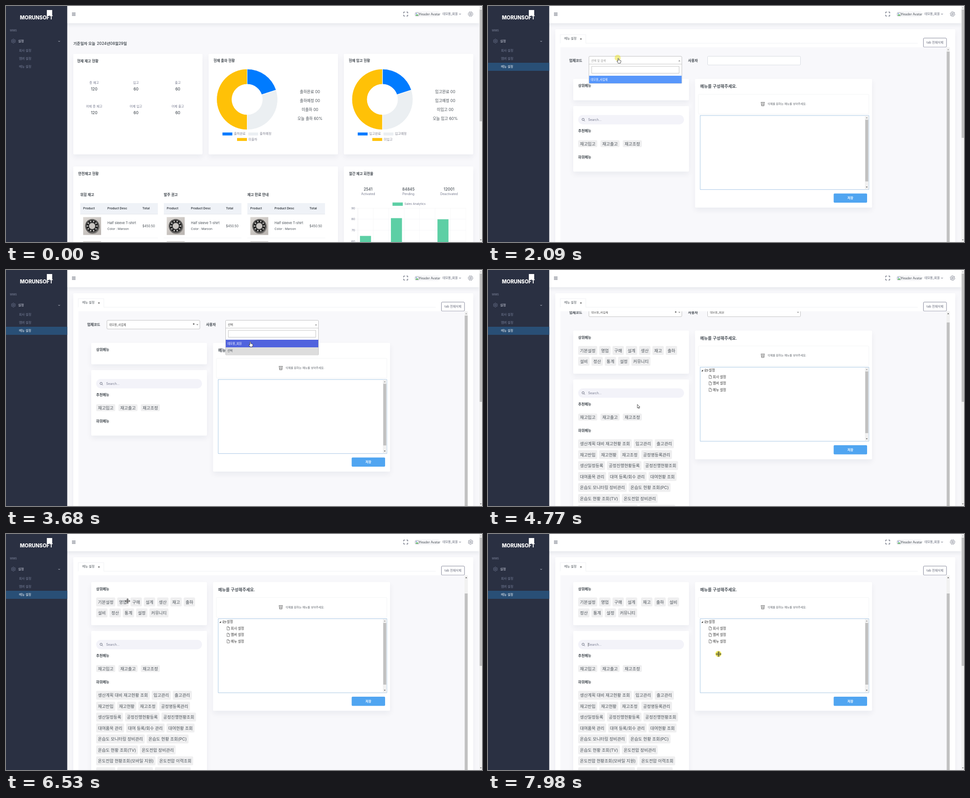
An HTML page with a canvas for the animation above (8 s loop, 1061 by 528 pixels).

```html
<!DOCTYPE html>
<html lang="ko">
<head>
<meta charset="utf-8">
<title>WMS</title>
<style>
html, body { margin: 0; width: 100%; height: 100%; overflow: hidden; background: #f8f8fb; }
canvas { display: block; width: 1061px; height: 528px; }
</style>
</head>
<body>
<canvas id="stage"></canvas>
<script>
const W = 1061, H = 528, LOOP = 8000;
const canvas = document.getElementById('stage');
const ctx = canvas.getContext('2d');
const dpr = window.devicePixelRatio || 1;
canvas.width = W * dpr;
canvas.height = H * dpr;

const FONT = 'Inter, "Noto Sans CJK KR", "Noto Sans CJK", sans-serif';
const INK = '#495057', DARK = '#3d444b', MUTED = '#74788d', NAV = '#79829c';
const BRAND = 'MORUNSOFT', USER = '데모용_회원', COMPANY = '데모용_사업체';

// ---------- helpers ----------
function text(s, x, y, size, color = INK, weight = 400, align = 'left', font = FONT) {
  ctx.font = `${weight} ${size}px ${font}`;
  ctx.fillStyle = color;
  ctx.textAlign = align;
  ctx.fillText(s, x, y + size * 0.36);
}

function rect(x1, y1, x2, y2, color) {
  ctx.fillStyle = color;
  ctx.fillRect(x1, y1, x2 - x1, y2 - y1);
}

function box(x1, y1, x2, y2, r, fill, stroke, lw = 0.7) {
  ctx.beginPath();
  ctx.roundRect(x1, y1, x2 - x1, y2 - y1, r);
  if (fill) { ctx.fillStyle = fill; ctx.fill(); }
  if (stroke) { ctx.strokeStyle = stroke; ctx.lineWidth = lw; ctx.stroke(); }
}

function card(x1, y1, x2, y2) {
  ctx.save();
  ctx.shadowColor = 'rgba(18,38,63,0.06)';
  ctx.shadowBlur = 13 * dpr;
  ctx.shadowOffsetY = 6 * dpr;
  box(x1, y1, x2, y2, 2, '#fff');
  ctx.restore();
}

function line(pts, color, lw = 1) {
  ctx.beginPath();
  for (let i = 0; i < pts.length; i += 2) ctx.lineTo(pts[i], pts[i + 1]);
  ctx.strokeStyle = color;
  ctx.lineWidth = lw;
  ctx.stroke();
}

function poly(pts, fill) {
  ctx.beginPath();
  for (let i = 0; i < pts.length; i += 2) ctx.lineTo(pts[i], pts[i + 1]);
  ctx.closePath();
  ctx.fillStyle = fill;
  ctx.fill();
}

function disc(x, y, r, fill) {
  ctx.beginPath();
  ctx.arc(x, y, r, 0, Math.PI * 2);
  ctx.fillStyle = fill;
  ctx.fill();
}

function ring(x, y, r, color, lw) {
  ctx.beginPath();
  ctx.arc(x, y, r, 0, Math.PI * 2);
  ctx.strokeStyle = color;
  ctx.lineWidth = lw;
  ctx.stroke();
}

// dir 1 points down, -1 points up
const caret = (x, y, dir, color, r = 2.3) =>
  poly([x - r, y - dir * r / 2, x + r, y - dir * r / 2, x, y + dir * r / 2], color);
const chevron = (x, y, color) => line([x - 1.8, y - 1, x, y + 1, x + 1.8, y - 1], color, 0.9);

function gear(x, y, r, angle, color) {
  ctx.beginPath();
  for (let i = 0; i < 48; i++) {
    const a = i * Math.PI / 24, d = r * (0.89 + 0.11 * Math.cos(6 * a));
    ctx.lineTo(x + d * Math.cos(a + angle), y + d * Math.sin(a + angle));
  }
  ctx.closePath();
  ctx.strokeStyle = color;
  ctx.lineWidth = 0.9;
  ctx.stroke();
  ring(x, y, r * 0.36, color, 0.9);
}

// ---------- frame around the pages ----------
function sidebar(t, onMenu) {
  rect(0, 0, 136.5, H, '#2a3042');
  rect(91, 9, 103, 21, '#fff');
  text(BRAND, 31, 26, 11.2, '#fff', 800);
  text('WMS', 8.5, 54.5, 6.1, '#6a7187', 600);
  gear(16.5, 78.5, 4.7, Math.PI / 6, NAV);
  text('설정', 27, 78.5, 7.1, '#d3d7e4', 500);
  chevron(118.5, 79, '#d3d7e4');
  text('회사 설정', 29, 100, 6.9, NAV);
  text('멤버 설정', 29, 118, 6.9, NAV);
  if (onMenu) rect(0, 127, 136.5, 145, '#294f76');
  const lit = onMenu || t >= 880;
  text('메뉴 설정', 29, 135.5, 6.9, lit ? '#fff' : NAV, lit ? 500 : 400);
}

function header(t, thumbEnd) {
  ctx.save();
  ctx.shadowColor = 'rgba(18,38,63,0.07)';
  ctx.shadowBlur = 8 * dpr;
  ctx.shadowOffsetY = 4 * dpr;
  rect(130, 0, 1055, 38.5, '#fff');
  ctx.restore();
  for (const y of [15.6, 18.4, 21.2]) line([147, y, 155, y], '#444a5c', 1);
  for (const sx of [-1, 1]) for (const sy of [-1, 1]) {
    const x = 891 + sx * 4.5, y = 18 + sy * 4.5;
    line([x - sx * 3, y, x, y, x, y - sy * 3], '#555b6d', 1.1);
  }
  box(910, 12, 968, 24.5, 6, '#f6f6f8');
  box(912.5, 15, 920, 22, 1, '#fff', '#8a8f99', 0.8);
  poly([913, 21.5, 916, 18, 918, 20, 919.5, 21.5], '#4caf50');
  disc(915, 17, 1.1, '#5b8def');
  text('Header Avatar', 920.5, 18.5, 7, INK);
  text(USER, 973, 18, 6.7, '#555b6d');
  chevron(1012, 18, '#555b6d');
  gear(1035.5, 18, 5.3, t / 2000 * Math.PI * 2, '#555b6d');
  rect(1055, 0, W, H, '#f1f1f1');
  rect(1055.8, 8, W, thumbEnd, '#c1c1c1');
  caret(1058.3, 4, -1, '#a3a3a3', 1.8);
  caret(1058.3, 523.5, 1, '#505050', 1.8);
}

// ---------- dashboard ----------
function stat(label, value, x, y) {
  text(label, x, y, 7, MUTED, 400, 'center');
  text(value, x, y + 15, 8.6, INK, 500, 'center');
}

function doughnut(cx, word) {
  const cy = 209, parts = [[-0.5, -0.1, '#007bff'], [-0.1, 0.5, '#ebeff2'], [0.5, 1.5, '#ffc107']];
  for (const [a, b, color] of parts) {
    ctx.beginPath();
    ctx.arc(cx, cy, 68, a * Math.PI, b * Math.PI);
    ctx.arc(cx, cy, 34, b * Math.PI, a * Math.PI, true);
    ctx.closePath();
    ctx.fillStyle = color;
    ctx.fill();
    ctx.strokeStyle = '#fff';
    ctx.lineWidth = 1;
    ctx.stroke();
  }
  text(`현재 ${word} 현황`, cx - 75, 122.5, 7.9, DARK, 600);
  const keys = [[-55, 283, '#007bff', word + '완료'], [2.5, 283, '#ebeff2', word + '예정'], [-22.5, 295.3, '#ffc107', '미' + word]];
  for (const [dx, y, color, label] of keys) {
    rect(cx + dx, y, cx + dx + 22, y + 6.6, color);
    text(label, cx + dx + 25.5, y + 2.8, 7.1, '#808291');
  }
  [`${word}완료 00`, `${word}예정 00`, `미${word} 00`, `오늘 ${word} 60%`].forEach((s, i) =>
    text(s, cx + 140, 192.2 + 19.8 * i, 8.6, INK, 400, 'center'));
}

function bearing(x, y) {
  const g = ctx.createLinearGradient(x, y, x + 30, y + 40);
  g.addColorStop(0, '#dcd8d4');
  g.addColorStop(1, '#bcb7b3');
  ctx.fillStyle = g;
  ctx.fillRect(x, y, 40, 40);
  const cx = x + 20, cy = y + 20;
  disc(cx + 1, cy + 2, 15.8, '#8d8986');
  disc(cx, cy, 15.5, '#343434');
  ring(cx, cy, 14.3, '#85827f', 1);
  ring(cx, cy, 10.7, '#1c1c1c', 4.4);
  for (let i = 0; i < 10; i++) {
    const a = i * Math.PI / 5;
    disc(cx + 10.7 * Math.cos(a), cy + 10.7 * Math.sin(a), 1.7, '#c9c7c5');
  }
  disc(cx, cy, 7, '#cbc7c3');
  ring(cx, cy, 7.3, '#555', 1.2);
}

function stockTable(title, x) {
  text(title, x, 422.5, 7.9, DARK, 600);
  rect(x, 441, x + 173, 466, '#eff2f7');
  line([x, 465.7, x + 173, 465.7], '#dde1e7', 0.7);
  text('Product', x + 6.5, 453, 6.8, '#343a40', 600);
  text('Product Desc', x + 60.5, 453, 6.8, '#343a40', 600);
  text('Total', x + 138.5, 453, 6.8, '#343a40', 600);
  bearing(x + 6.5, 472.3);
  text('Half sleeve T-shirt', x + 60.5, 485, 7.4, INK);
  text('Color : Maroon', x + 60.5, 499, 6.8, INK);
  text('$450.50', x + 138.5, 492, 7, INK);
  line([x, 519, x + 173, 519], '#eceef2', 0.7);
  rect(x + 6.5, 526.3, x + 46.5, H, '#d5d2d0');
}

function salesChart() {
  text('월간 재고 회전율', 764.5, 375, 7.8, DARK, 600);
  [['2541', 'Activated', 807], ['84845', 'Pending', 897], ['12001', 'Deactivated', 987.5]].forEach(([n, s, x]) => {
    text(n, x, 409.5, 8.7, INK, 500, 'center');
    text(s, x, 421, 6.9, MUTED, 400, 'center');
  });
  rect(861.5, 439.6, 884.5, 447, '#5dcfa5');
  text('Sales Analytics', 888, 443, 6.6, '#74788d');
  for (let i = 0; i < 4; i++) {
    const y = 452.4 + i * 24.6;
    text(String(90 - i * 10), 778, y, 6.6, '#74788d', 400, 'right');
    line([779, y, 1025, y], '#f0f0f3', 0.6);
  }
  for (let i = 0; i < 8; i++) line([784.3 + i * 34.4, 452, 784.3 + i * 34.4, H], i ? '#f2f2f5' : '#e4e4e8', 0.6);
  for (const [x, y] of [[789, 514.4], [858, 474.6], [961.7, 477.2]]) rect(x, y, x + 24.6, H, '#5dcfa5');
}

function dashboard() {
  text('기준일자 오늘', 150, 83.5, 8.5, INK, 600);
  text('2024년08월29일', 202.5, 83.5, 8.5, INK, 600);
  card(150, 107, 438, 332);
  card(451.5, 107, 740, 332);
  card(753, 107, 1041.5, 332);
  card(150, 359, 740, 560);
  card(753, 359, 1041.5, 560);
  text('현재 재고 현황', 158.5, 123, 7.9, DARK, 600);
  ['총 재고', '입고', '출고'].forEach((s, i) => stat(s, i ? '60' : '120', 196.5 + 93.2 * i, 171.3));
  ['어제 총 재고', '어제 입고', '어제 출고'].forEach((s, i) => stat(s, i ? '60' : '120', 196.5 + 93.2 * i, 224));
  doughnut(537.5, '출하');
  doughnut(839, '입고');
  text('안전재고 현황', 161, 375, 7.9, DARK, 600);
  ['위험 재고', '발주 권고', '재고 만료 안내'].forEach((s, i) => stockTable(s, 165.5 + 186.3 * i));
  salesChart();
}

// ---------- menu page ----------
const TOP = [
  ['기본설정', '영업', '구매', '설계', '생산', '재고', '출하'],
  ['설비', '정산', '통계', '설정', '커뮤니티']
];
// the empty entry leaves a doubled gap
const TOP_TAKEN = [
  ['기본설정', '영업', '구매', '설계', '', '재고', '출하', '설비'],
  ['정산', '통계', '설정', '커뮤니티']
];
const SUB = [
  ['생산계획 대비 재고현황 조회', '입고관리', '출고관리'],
  ['재고반입', '재고현황', '재고조정', '공정명등록관리'],
  ['생산일정등록', '공정진행현황등록', '공정진행현황조회'],
  ['대여품목 관리', '대여 등록/회수 관리', '대여현황 조회'],
  ['온습도 모니터링 장비관리', '온습도 현황 조회(PC)'],
  ['온습도 현황 조회(TV)', '온도전압 장비관리'],
  ['온도전압 현황조회(모바일 지원)', '온도전압 이력조회'],
  ['이력관리', '온도전압 알림설정', '온도전압 통계조회']
];

function chip(s, x, y, h = 20) {
  ctx.font = `400 9.4px ${FONT}`;
  const w = ctx.measureText(s).width + 8;
  box(x, y - h / 2, x + w, y + h / 2, 2.5, '#efeff0');
  text(s, x + 4, y + 0.3, 9.4, INK);
  return w;
}

function chipRow(row, y, gap = 4.4, h = 20) {
  let x = 201;
  for (const s of row) x += (s ? chip(s, x, y, h) : 0) + gap;
}

function dropdown(x, options) {
  const end = 156 + 17 * options.length;
  box(x, 130, x + 207, end, 1, '#fff', '#aaa');
  box(x + 6, 135, x + 201, 150.5, 0, '#fff', '#aaa');
  options.forEach(([s, bg, color], i) => {
    rect(x + 0.4, 156 + 17 * i, x + 206.6, 173 + 17 * i, bg);
    text(s, x + 4, 164.3 + 16.7 * i, 6.3, color);
  });
}

function select(x, label, color, open, arrow) {
  box(x, 112.5, x + 207, 132, 2, '#fff', label ? '#aaa' : '#c9ced6');
  text(label, x + 5, 122.5, 6.3, color);
  if (arrow) caret(x + 201.5, 122.5, open ? -1 : 1, '#888');
}

function treeIcon(x, y, folder) {
  const pts = folder
    ? [x - 3.4, y + 2.6, x - 3.4, y - 2.6, x - 1, y - 2.6, x, y - 1.6, x + 2.6, y - 1.6, x + 2.6, y - 0.4, x - 1.8, y - 0.4, x - 3.4, y + 2.6, x + 2.4, y + 2.6, x + 3.8, y - 0.4, x + 2.6, y - 0.4]
    : [x - 2.7, y - 3.7, x + 0.6, y - 3.7, x + 2.7, y - 1.6, x + 2.7, y + 3.7, x - 2.7, y + 3.7, x - 2.7, y - 3.7];
  line(pts, '#444', 0.7);
  if (!folder) line([x + 0.6, y - 3.7, x + 0.6, y - 1.6, x + 2.7, y - 1.6], '#444', 0.7);
}

function builder(loaded) {
  card(461.5, 163, 856, 451);
  text('메뉴를 구성해주세요.', 473, 180, 9.3, INK, 600);
  box(469, 197.5, 849, 242, 2, null, '#eeeff3');
  line([608, 215.6, 617, 215.6], '#555', 1);
  line([608.8, 216.5, 609.8, 223.5, 615.2, 223.5, 616.2, 216.5], '#666', 0.8);
  for (const x of [610.6, 612.5, 614.4]) line([x, 217, x, 222.8], '#777', 0.8);
  text('삭제를 원하는 메뉴를 넣어주세요.', 623, 218.8, 6.2, '#5d636a');
  box(473, 245, 849, 410.7, 0, '#fff', '#8fb6dc', 0.8);
  rect(840, 245.5, 848.5, 410.2, '#f1f1f1');
  rect(841, 254.5, 847.6, 392.5, '#c1c1c1');
  caret(844.2, 250, -1, '#888', 2);
  caret(844.2, 405.2, 1, '#444', 2);
  box(770.5, 419.5, 845, 440, 2, '#50a5f1');
  text('저장', 807.7, 429.7, 7, '#fff', 600, 'center');
  if (!loaded) return;
  poly([475.5, 254.2, 479.3, 254.2, 479.3, 250.4], '#333');
  treeIcon(487, 252, true);
  text('설정', 492, 252.2, 7.6, '#333');
  ['회사 설정', '멤버 설정', '메뉴 설정'].forEach((s, i) => {
    treeIcon(495.4, 266.6 + 14.5 * i, false);
    text(s, 501, 266.7 + 14.5 * i, 7.5, '#333');
  });
}

function menuLists(t, loaded) {
  const d = loaded ? 48.5 : 0;
  card(190, 163, 448, 211 + d);
  text('상위메뉴', 201, 178.6, 7.9, DARK, 600);
  card(190, 224 + d, 448, loaded ? 700 : 370.5);
  box(201, 243.7 + d, 437, 264.9 + d, 10.6, '#f3f3f9');
  ring(212, 253.8 + d, 2.5, '#555b6d', 0.9);
  line([213.8, 255.6 + d, 216, 257.8 + d], '#555b6d', 0.9);
  text('Search...', 223.3, 254.5 + d, 7.1, MUTED);
  if (t >= 5750 && (t - 5750) % 1060 < 530) line([223.3, 250.5 + d, 223.3, 258.7 + d], '#333', 0.7);
  text('추천메뉴', 201, 278.8 + d, 7.9, DARK, 600);
  chipRow(['재고입고', '재고출고', '재고조정'], 308 + d, 7.2, 15.4);
  text('하위메뉴', 201, 338.6 + d, 7.9, DARK, 600);
  if (!loaded) return;
  (t >= DRAG ? TOP_TAKEN : TOP).forEach((row, i) => chipRow(row, 207.5 + 24.4 * i));
  SUB.forEach((row, i) => chipRow(row, 416.2 + 24.45 * i));
}

const DRAG = 7460;

function menuPage(t) {
  const loaded = t >= 3930;
  const p = Math.min(1, Math.max(0, (t - 4700) / 450));
  const scroll = 55.5 * (1 - (1 - p) ** 4);
  card(150, 52, 1041.5, 600);
  line([161, 83.3, 161, 64, 218, 64, 218, 83.3, 958, 83.3], '#eceef2', 0.8);
  text('메뉴 설정', 170, 73, 6.9, INK);
  text('×', 207, 73, 7, '#333', 600, 'center');
  box(970.5, 71.8, 1022, 92, 2, '#fff', '#74788d', 0.9);
  text('tab 전체삭제', 996.2, 82, 6.9, '#636778', 400, 'center');

  ctx.save();
  ctx.beginPath();
  ctx.rect(161.5, 92.5, 860.5, H);
  ctx.clip();
  rect(161, 92, 1022, H, '#f8f8fb');
  ctx.translate(0, -scroll);
  menuLists(t, loaded);
  builder(loaded);
  const compOpen = t >= 2010 && t < 2660, picked = t >= 2660;
  const userOpen = t >= 3220 && t < 3800, userSet = t >= 3800;
  text('업체코드', 181, 122.3, 7.9, DARK, 600);
  select(225, picked ? COMPANY : '선택 및 검색', picked ? '#444' : '#999', compOpen, true);
  if (picked) text('×', 418.3, 120.6, 7, '#333', 700, 'center');
  text('사용자', 446, 122.3, 7.9, DARK, 600);
  select(489.5, userSet ? USER : picked ? '선택' : '', '#444', userOpen, picked);
  if (compOpen) dropdown(225, [[COMPANY, '#5897fb', '#fff']]);
  if (userOpen) dropdown(489.5, t < 3450
    ? [[USER, '#fff', INK], ['선택', '#5897fb', '#fff']]
    : [[USER, '#5163de', '#fff'], ['선택', '#ddd', INK]]);
  ctx.restore();

  rect(1022, 92.5, 1029.5, H, '#f1f1f1');
  rect(1022.5, 102 + scroll * 0.56, 1029, H, '#c1c1c1');
  caret(1025.8, 97.5, -1, scroll ? '#333' : '#909090', 2);

  if (t >= DRAG) {
    const c = pointer(t);
    ctx.save();
    ctx.beginPath();
    ctx.rect(190, 107.5, 258, 96.5);
    ctx.clip();
    chip('생산', c.x - 12.6, c.y);
    ctx.restore();
  }
}

// ---------- pointer ----------
// time, x, y, shape from this point on
const PATH = [
  [40, 430, 536, 'arrow'], [420, 237, 190, 'arrow'], [800, 84, 160, 'arrow'], [940, 53, 135, 'arrow'],
  [1430, 53, 135, 'arrow'], [1930, 289.5, 116.5, 'hand'], [2150, 289.5, 116.5, 'hand'],
  [2520, 262, 162, 'hand'], [2720, 262, 162, 'arrow'], [3080, 592, 121, 'hand'], [3280, 592, 121, 'hand'],
  [3600, 543.5, 160.5, 'hand'], [3850, 543.5, 160.5, 'arrow'], [4450, 350, 290, 'arrow'],
  [4850, 331, 302, 'beam'], [5080, 331, 302, 'beam'], [5600, 310, 247, 'beam'], [5780, 310, 247, 'arrow'],
  [6130, 186, 165, 'arrow'], [6480, 271, 150, 'move'], [6640, 271, 150, 'move'], [7050, 350, 152, 'move'],
  [7450, 350, 152, 'move'], [7920, 514, 268.7, 'move'], [8001, 514, 268.7, 'move']
];
const CLICKS = [[1130, 1260], [1950, 2030], [2590, 2670], [3150, 3230], [3740, 3820], [5680, 5760], [7380, 8100]];

function pointer(t) {
  const i = PATH.findIndex(k => k[0] > t);
  if (i < 1) return null;
  const [t0, x0, y0, shape] = PATH[i - 1], [t1, x1, y1] = PATH[i];
  const u = (t - t0) / (t1 - t0), e = u * u * (3 - 2 * u);
  return { x: x0 + (x1 - x0) * e, y: y0 + (y1 - y0) * e, shape };
}

const SHAPES = {
  arrow: new Path2D('M0 0V8.2L1.9 6.5L3.1 9.2L4.4 8.6L3.2 6H5.8Z'),
  hand: new Path2D('M0 1Q1 -.6 2 1V4.4Q3.2 3.6 3.8 4.8Q5 4.2 5.4 5.3Q6.6 5 6.7 6.2V8.4L5.6 11.5H.6L-2 7.6Q-2.4 6.2 -1 6.4L0 7.4Z'),
  beam: new Path2D('M-1.8 -4.5H-.5L0 -4L.5 -4.5H1.8M0 -4V4M-1.8 4.5H-.5L0 4L.5 4.5H1.8')
};

function drawMove() {
  for (let i = 0; i < 4; i++) {
    ctx.rotate(Math.PI / 2);
    line([0, 0, 0, -4], '#333', 1);
    ctx.beginPath();
    ctx.moveTo(-2, -3.4);
    ctx.lineTo(0, -5.8);
    ctx.lineTo(2, -3.4);
    ctx.closePath();
    ctx.strokeStyle = '#333';
    ctx.lineWidth = 0.8;
    ctx.stroke();
  }
  ring(0, 0, 1.2, '#333', 0.7);
}

function drawPointer(t) {
  const c = pointer(t);
  if (!c) return;
  for (const [a, b] of CLICKS) {
    const fade = t < a ? 0 : t < b ? 1 : 1 - (t - b) / 200;
    if (fade <= 0) continue;
    ctx.globalAlpha = 0.72 * fade;
    disc(c.x - 0.5, c.y - 0.5, 6.8, '#e8df1e');
    ctx.globalAlpha = 1;
  }
  ctx.save();
  ctx.translate(c.x, c.y);
  if (c.shape === 'move') drawMove();
  else {
    const solid = c.shape !== 'beam';
    if (solid) { ctx.fillStyle = '#fff'; ctx.fill(SHAPES[c.shape]); }
    ctx.strokeStyle = '#222';
    ctx.lineWidth = 0.8;
    ctx.stroke(SHAPES[c.shape]);
  }
  ctx.restore();
}

// ---------- loop ----------
function draw(t) {
  ctx.setTransform(dpr, 0, 0, dpr, 0, 0);
  rect(0, 0, W, H, '#f8f8fb');
  const onMenu = t >= 1400;
  if (onMenu) menuPage(t); else dashboard();
  header(t, onMenu ? 295 : 258);
  sidebar(t, onMenu);
  if (t >= 880 && t < 1660) {
    box(-2, 517, 53.5, 530, 1.5, '#1f2023');
    text('127.0.0.1:8000/#', 1, 522.6, 6.3, '#d8d8d8', 400, 'left', '"Open Sans", sans-serif');
  }
  drawPointer(t);
}

const start = performance.now();
function tick() {
  draw((performance.now() - start) % LOOP);
  requestAnimationFrame(tick);
}
tick();
</script>
</body>
</html>
```
